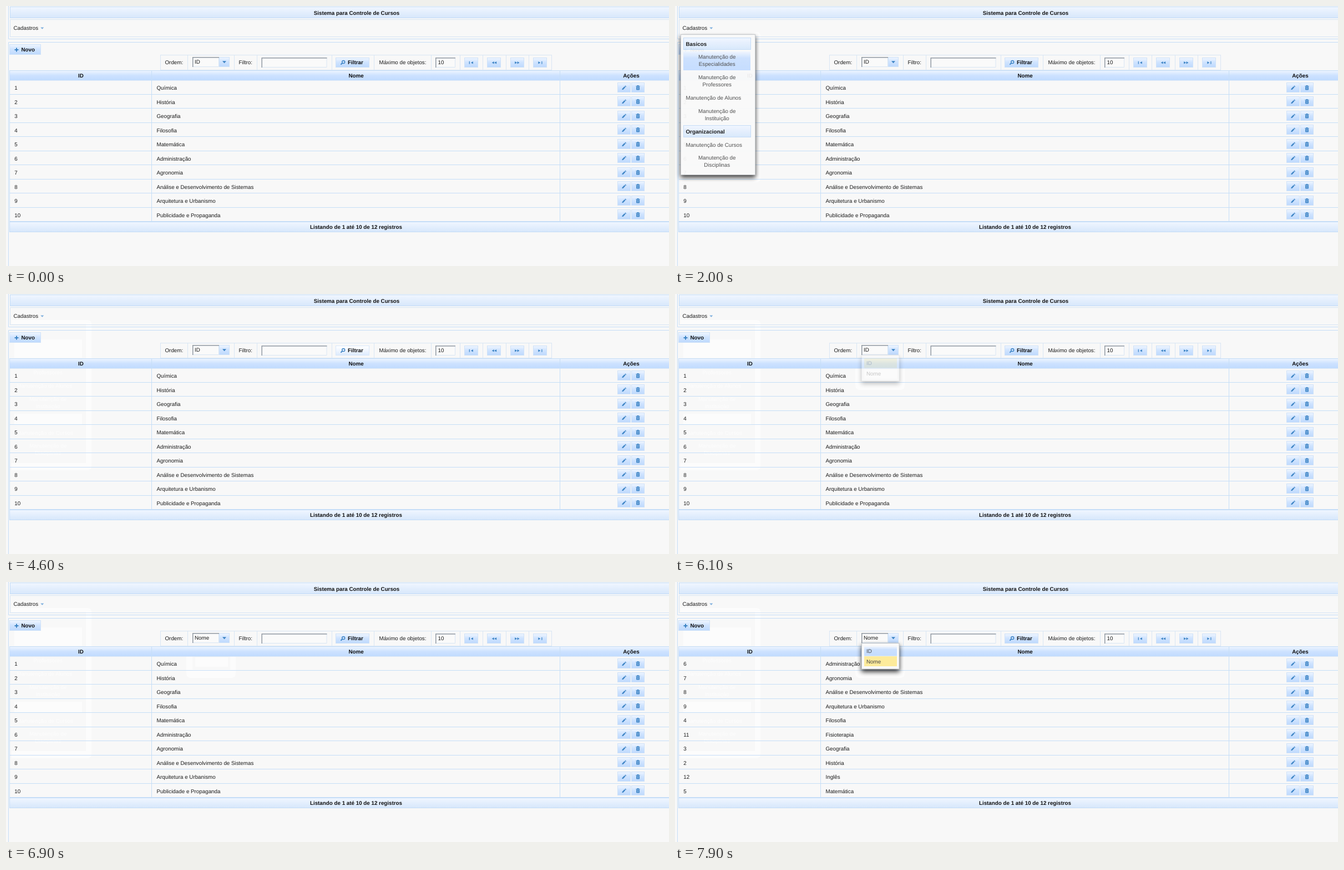
Animation, 1195 px wide and 469 px high, one loop 8000 ms. Source, as an HTML page:

```html
<!DOCTYPE html>
<html lang="pt-BR">
<head>
<meta charset="utf-8">
<title>Controle de Cursos</title>
<style>
html, body { margin: 0; width: 100%; height: 100%; overflow: hidden; background: #f8f8f8; }
svg { display: block; width: 1195px; height: 469px; }
text { font: 9.8px "Liberation Sans", Arial, sans-serif; fill: #1c1c1c; text-rendering: geometricPrecision; }
.b { font-weight: bold; fill: #111; }
.m { fill: #484848; }
.c { text-anchor: middle; }
.ghost { opacity: 0; fill: #fff; }
.ghost text { fill: #fff; }
.line { stroke: #c6def7; fill: none; }
.grid { stroke: #d9e6f4; fill: none; }
.ico { stroke: #3c83c4; fill: none; }
.icf { fill: #3c83c4; }

/* All states share one 8 s clock and switch in hard steps. */
.t { opacity: 0; animation: 8s step-end -15ms infinite; }
.hover { animation-name: hover; }
.menu { animation-name: menu; }
.pick { animation-name: pick; }
.trail { animation-name: trail; }
.filter { animation-name: filter; }
.drop { animation-name: drop; }
.over2 { animation-name: over2; }
.over1 { animation-name: over1; }
.sel1 { animation-name: before; }
.sel2 { animation-name: after; }
.rows1 { animation-name: old; }
.rows2 { animation-name: sorted; }
.trail2 { animation-name: trail2; }
@keyframes hover { 0% { opacity: 0 } 6.25% { opacity: 1 } 25%, 100% { opacity: 0 } }
@keyframes menu { 0% { opacity: 0 } 6.25% { opacity: 1 } 25% { opacity: .95 } 26.25% { opacity: .12 } 31.25%, 100% { opacity: 0 } }
@keyframes pick { 0% { opacity: 0 } 18.75%, 100% { opacity: 1 } }
@keyframes trail { 0% { opacity: 0 } 6.25%, 100% { opacity: .7 } }
@keyframes filter { 0% { opacity: 0 } 57.5% { opacity: 1 } 58.75%, 100% { opacity: 0 } }
@keyframes drop {
  0% { opacity: 0 } 76.25% { opacity: .3 } 77.5% { opacity: .8 } 78.75% { opacity: 1 }
  86.25% { opacity: 0 } 96.25% { opacity: .3 } 97.5% { opacity: .8 } 98.75%, 100% { opacity: 1 }
}
@keyframes over2 { 0% { opacity: 0 } 83.75% { opacity: 1 } 86.25%, 100% { opacity: 0 } }
@keyframes over1 { 0% { opacity: 0 } 98.75%, 100% { opacity: 1 } }
@keyframes before { 0% { opacity: 1 } 86.25%, 100% { opacity: 0 } }
@keyframes after { 0% { opacity: 0 } 86.25%, 100% { opacity: 1 } }
@keyframes old { 0% { opacity: 1 } 87.5%, 100% { opacity: 0 } }
@keyframes sorted { 0% { opacity: 0 } 87.5%, 100% { opacity: 1 } }
@keyframes trail2 { 0% { opacity: 0 } 76.25%, 100% { opacity: .7 } }
</style>
</head>
<body>
<script>
const text = (x, y, s, cls = '') => `<text x="${x}" y="${y}" class="${cls}">${s}</text>`;
const rect = (x, y, w, h, fill, more = '') =>
  `<rect x="${x}" y="${y}" width="${w}" height="${h}" fill="${fill}" ${more}/>`;
const path = (d, cls, more = '') => `<path d="${d}" class="${cls}" ${more}/>`;
const group = (cls, ...parts) => `<g class="${cls}">${parts.join('')}</g>`;
const at = (x, y, s) => `<g transform="translate(${x} ${y})">${s}</g>`;
const grad = (id, ...stops) => `<linearGradient id="${id}" x2="0" y2="1">` +
  stops.map(([o, c]) => `<stop offset="${o}" stop-color="${c}"/>`).join('') + '</linearGradient>';

const box = (x, y, w, h, fill, stroke = '#c3dcf7') =>
  rect(x + .5, y + .5, w - 1, h - 1, fill, `stroke="${stroke}"`);
const button = (x, y, w, h) => box(x, y, w, h, 'url(#btn)', '#cfe2f8');
const input = (x, y, w, h) => rect(x, y, w, h, '#fafafa') +
  path(`M${x + w - .5} ${y}v${h - .5}h${-w}`, 'grid') +
  path(`M${x + .75} ${y + h}v${.75 - h}h${w - .75}`, '', 'fill="none" stroke="#929aa3" stroke-width="1.5"');

const pencil = path('M-2.8 2.8L1.4-1.4', 'ico', 'stroke-width="2.2"') +
  path('M2-2L3-3', 'ico', 'stroke-width="2.4"') + path('M-4 4l.7-2.4 1.7 1.7z', 'icf');
const trash = path('M-3.5-2.7h7M-1.3-3.8h2.6', 'ico', 'stroke-width="1.1"') +
  path('M-3-1.5h6v4.6q0 1-1 1h-4q-1 0-1-1z', 'icf') +
  path('M-1-.6v3.6M1-.6v3.6', '', 'stroke="#c5deff" stroke-width=".7"');
const lens = '<circle cx="1.2" cy="-1" r="2.5" class="ico" stroke-width="1.4"/>' +
  path('M-.8 1L-3.6 3.6', 'ico', 'stroke-width="1.9"');
const tri = (x, dir) => path(`M${x + 2 * dir} 0l${-4 * dir}-2.2v4.4z`, 'icf');
const bar = x => path(`M${x}-2.5v5`, 'ico', 'stroke-width="1.2"');
const nav = [bar(-3.2) + tri(1.4, -1), tri(-2.2, -1) + tri(2.2, -1),
  tri(-2.2, 1) + tri(2.2, 1), tri(-1.4, 1) + bar(3.2)];

const courses = ['Química', 'História', 'Geografia', 'Filosofia', 'Matemática', 'Administração', 'Agronomia',
  'Análise e Desenvolvimento de Sistemas', 'Arquitetura e Urbanismo', 'Publicidade e Propaganda',
  'Fisioterapia', 'Inglês'];
const rowY = i => 134 + 25.5 * i;
const rows = ids => ids.map((id, i) =>
  text(15.3, rowY(i) + 17, id) + text(271.5, rowY(i) + 17, courses[id - 1])).join('');
const byId = [1, 2, 3, 4, 5, 6, 7, 8, 9, 10];
const byName = [6, 7, 8, 9, 4, 11, 3, 2, 12, 5];

const frame = () =>
  path('M4.5 0V59.5H1195M1195 65.5H4.5V469', 'line') +
  box(7, 1, 1200, 21, 'url(#bar)') + text(632, 16, 'Sistema para Controle de Cursos', 'b c') +
  path('M1195 24.5H7.5V55.5H1195', 'line', 'style="stroke:#d6e4f3"') +
  group('t hover', box(9, 29, 67, 21, 'url(#hot)')) +
  text(13.5, 43.2, 'Cadastros') + path('M62.3 38.4h6l-3 3.4z', '', 'fill="#7daedd"') +
  button(6, 69, 57, 19) + path('M15.5 79h7M19 75.5v7', 'ico', 'stroke-width="2"') +
  text(27.5, 82.3, 'Novo', 'b');

const toolbar = () =>
  path('M278 88.5H984M278 115.5H984' +
    [278.5, 327.5, 411.5, 452.5, 587.5, 663.5, 766.5, 818.5, 859.5, 901.5, 942.5, 983.5]
      .map(x => `M${x} 88V116`).join(''), 'grid') +
  text(286.5, 105.2, 'Ordem:') + text(419.5, 105.2, 'Filtro:') + text(672.5, 105.2, 'Máximo de objetos:') +
  input(336, 92, 48, 18) + button(384, 92, 19, 18) + path('M390 99.3h7l-3.5 4z', 'icf') +
  group('t sel1', text(340, 104.3, 'ID')) + group('t sel2', text(340, 104.3, 'Nome')) +
  input(460.5, 93, 118, 18) +
  button(594, 93, 61, 18) + group('t filter', box(594, 93, 61, 18, 'url(#lit)', '#d9e8fa')) +
  at(607, 102, lens) + text(616, 105.3, 'Filtrar', 'b') +
  input(774, 93, 36, 18) + text(778.5, 105.3, '10') +
  nav.map((icon, i) => button(826 + Math.round(41.4 * i), 93, 25, 18) +
    at(838.5 + 41.4 * i, 102.2, icon)).join('');

const table = () => {
  let s = box(6, 116, 1250, 18.5, 'url(#head)') +
    text(135, 129, 'ID', 'b c') + text(631, 129, 'Nome', 'b c') + text(1127, 129, 'Ações', 'b c');
  for (let i = 0; i < 10; i++) {
    const y = Math.floor(rowY(i));
    s += path(`M6 ${y + 25.5}H1195`, 'line') + button(1102, y + 4, 24, 18) + button(1127, y + 4, 24, 18) +
      at(1114.2, y + 13.3, pencil) + at(1139, y + 13.3, trash);
  }
  return s + path('M6.5 116V389M262.5 116V389M998.5 116V389', 'line') +
    group('t rows1', rows(byId)) + group('t rows2', rows(byName)) +
    box(6, 389, 1200, 19, 'url(#bar)') + text(631, 402, 'Listando de 1 até 10 de 12 registros', 'b c');
};

const pair = (y, word) => text(75.7, y, 'Manutenção de', 'm c') + text(75.7, y + 13.1, word, 'm c');
const items = () => pair(95.3, 'Especialidades') + pair(132, 'Professores') +
  text(19.5, 169.3, 'Manutenção de Alunos', 'm') + pair(193, 'Instituição') +
  text(19.5, 253.6, 'Manutenção de Cursos', 'm') + pair(277, 'Disciplinas');

// Popup panel with a soft shadow below it
const panel = (x, y, w, h) => rect(x, y + 4.5, w, h, '#000', 'opacity=".8" filter="url(#blur)"') +
  box(x, y, w, h, '#f9f9f9', '#c2c6ca');

const menu = () => group('t menu', panel(10, 51, 135, 254),
  box(15, 57, 122, 22, 'url(#bar)'), text(19.5, 72, 'Basicos', 'b'),
  group('t pick', rect(15, 82, 121, 34, 'url(#hot)')),
  box(15, 215, 122, 22, 'url(#bar)'), text(19.5, 230, 'Organizacional', 'b'), items());

const drop = () => group('t drop', panel(336, 110, 68.5, 47.5),
  group('t sel1', rect(341, 116, 59, 17.5, '#fdeb9b')),
  group('t sel2', rect(341, 134, 59, 18, '#fdeb9b')),
  group('t over2', rect(341, 134, 59, 18, 'url(#hot)')),
  group('t over1', rect(341, 116, 59, 17.5, 'url(#hot)')),
  text(345, 128.3, 'ID', 'm'), text(345, 146.5, 'Nome', 'm'));

// Faint white trace that the popups leave behind
const trails = () =>
  group('ghost t trail', path('M10 47H147q7 0 7 8V310q0 8-8 8H10V305H144V54H10z', ''),
    rect(15, 82, 122, 33, '#fff'), rect(15, 216, 122, 19, '#fff'), items()) +
  group('ghost t trail2', path('M325 134H336V158H404V134H414V164q0 9-9 9H334q-9 0-9-9z', ''),
    rect(341, 136, 59, 17, '#fff'));

document.body.innerHTML = `<svg viewBox="0 0 1195 469"><defs>
  ${grad('bar', [0, '#f0f6ff'], [1, '#d7e7fb'])}
  ${grad('btn', [0, '#f0f6ff'], [.45, '#d0e4ff'], [1, '#bed9fd'])}
  ${grad('lit', [0, '#ffffff'], [.5, '#f0f6ff'], [1, '#dceafd'])}
  ${grad('head', [0, '#eef5ff'], [.5, '#cde2ff'], [1, '#c1dbff'])}
  ${grad('hot', [0, '#f1f6fe'], [.35, '#cbe0fe'], [1, '#c3dcff'])}
  <filter id="blur" x="-40%" y="-60%" width="180%" height="220%"><feGaussianBlur stdDeviation="4.2"/></filter>
  </defs>${trails()}${frame()}${toolbar()}${table()}${menu()}${drop()}</svg>`;
</script>
</body>
</html>
```
